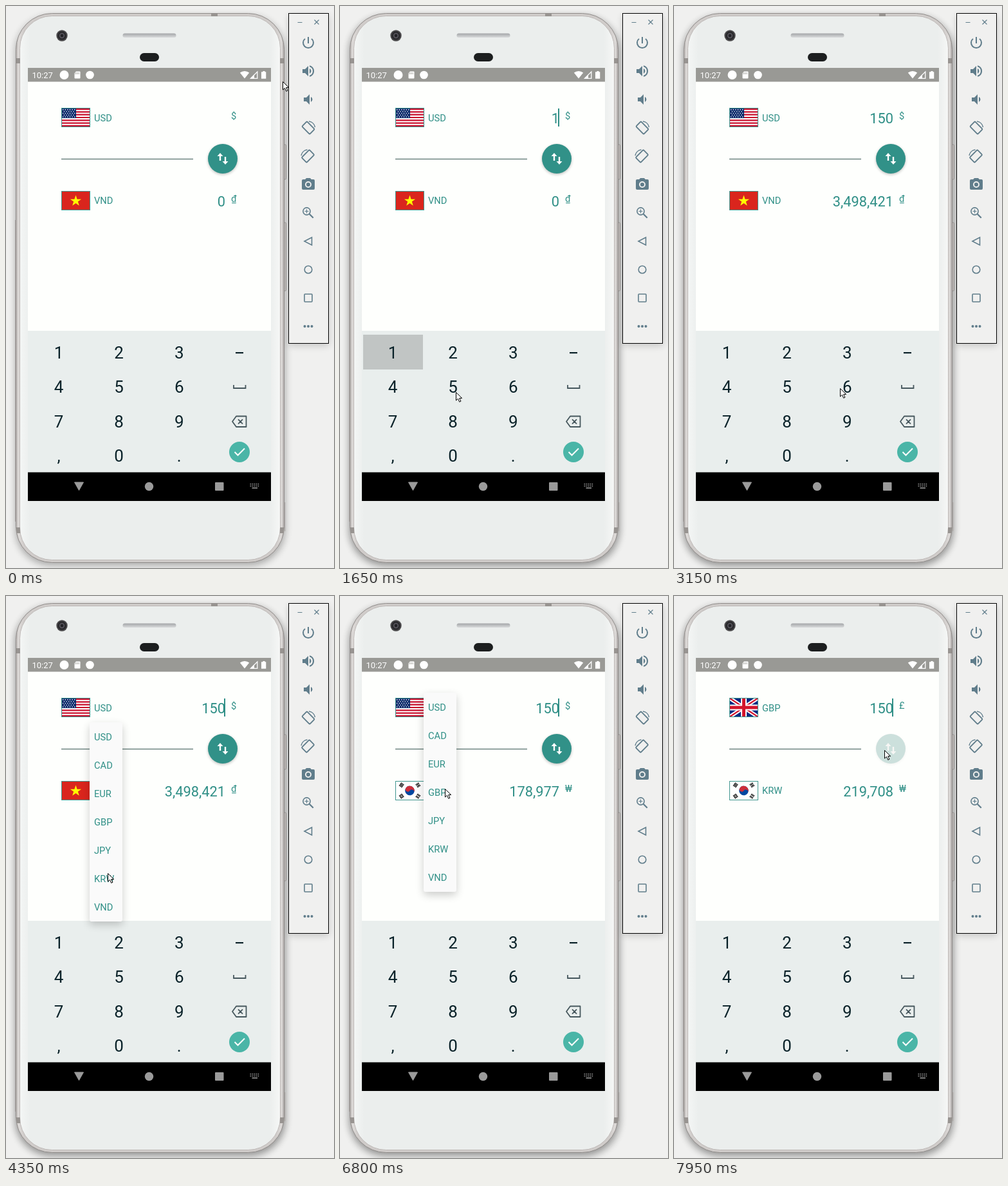
Write an HTML page that moves like this. It is 510 by 872 pixels and loops after 8000 ms.

```html
<!DOCTYPE html>
<html lang="en">
<head>
<meta charset="utf-8">
<title>Currency converter</title>
<style>
html, body { margin: 0; width: 510px; height: 872px; overflow: hidden; background: #f0f0ef; }
body { position: relative; font-family: Roboto, sans-serif; }
svg { position: absolute; left: 0; top: 0; overflow: visible; }
.teal { fill: #2f8f86; }
.label { font-size: 14.7px; }
.amount { font-size: 21.8px; text-anchor: end; }
.key { font-size: 26px; text-anchor: middle; fill: #0a2229; }
.icon { fill: #607d8b; }
.line { fill: none; stroke: #607d8b; stroke-width: 1.6; }

/* Parts that are visible for a while, switched hard */
.on { opacity: 0; animation: 8s step-end infinite; }
@keyframes focus { 7.5% { opacity: 1 } }
@keyframes caret { 11.25% { opacity: 1 } 34.375% { opacity: 0 } 40.625% { opacity: 1 } 66.25% { opacity: 0 }
  72.5% { opacity: 1 } 91.875% { opacity: 0 } 98.125% { opacity: 1 } }
@keyframes key1 { 17.5% { opacity: 1 } 21.25% { opacity: 0 } }
@keyframes key5 { 21.875% { opacity: 1 } 24.375% { opacity: 0 } }
@keyframes key0 { 28.125% { opacity: 1 } 30.625% { opacity: 0 } }
@keyframes in1 { 18.75% { opacity: 1 } 23.125% { opacity: 0 } }
@keyframes in15 { 23.125% { opacity: 1 } 29.375% { opacity: 0 } }
@keyframes in150 { 29.375% { opacity: 1 } }
@keyframes out0 { 0% { opacity: 1 } 25% { opacity: 0 } }
@keyframes out1 { 25% { opacity: 1 } 28.75% { opacity: 0 } }
@keyframes out15 { 28.75% { opacity: 1 } 33.75% { opacity: 0 } }
@keyframes out150 { 33.75% { opacity: 1 } 65% { opacity: 0 } }
@keyframes outKrw { 65% { opacity: 1 } 91.25% { opacity: 0 } }
@keyframes outGbp { 91.25% { opacity: 1 } }
@keyframes vnd { 0% { opacity: 1 } 60.625% { opacity: 0 } }
@keyframes krw { 60.625% { opacity: 1 } }
@keyframes usd { 0% { opacity: 1 } 86.25% { opacity: 0 } }
@keyframes gbp { 86.25% { opacity: 1 } }

#swap { animation: press 8s linear infinite; }
@keyframes press { 0%, 96.875% { opacity: 1 } 98.75%, 100% { opacity: .2 } }

.menu { position: absolute; left: 130px; width: 51px; height: 309px; overflow: hidden; opacity: 0;
  background: #fafafa; border-radius: 3px; box-shadow: 0 5px 13px rgba(0,0,0,.2);
  color: #2f8f86; font-size: 14.7px; animation: 8s ease-in-out infinite; }
.menu div { height: 44px; line-height: 46px; padding-left: 7px; }
#menuTo { top: 196px; animation-name: menuTo; }
#menuFrom { top: 150px; animation-name: menuFrom; }
@keyframes menuTo {
  0%, 49.3% { width: 0; height: 0; opacity: 0 } 52.5%, 60% { width: 51px; height: 309px; opacity: 1 }
  62.5%, 100% { width: 51px; height: 309px; opacity: 0 } }
@keyframes menuFrom {
  0%, 74.9% { width: 0; height: 0; opacity: 0 } 78.125%, 85.4% { width: 51px; height: 309px; opacity: 1 }
  88%, 100% { width: 51px; height: 309px; opacity: 0 } }

#pointer { animation: pointer 8s ease-in-out infinite; }
@keyframes pointer {
  0% { transform: translate(430px,117px) }
  5%, 10.625% { transform: translate(333px,171px) }
  15.625%, 18.125% { transform: translate(84px,542px) }
  20.625%, 23.75% { transform: translate(180px,599px) }
  27.5%, 30% { transform: translate(180px,675px) }
  35%, 38.75% { transform: translate(258px,597px) }
  39.375% { transform: translate(258px,593px) }
  46.25%, 50.625% { transform: translate(149px,298px) }
  54.375% { transform: translate(158px,430px) }
  55%, 56.6% { transform: translate(158px,434px) }
  56.875%, 61.25% { transform: translate(159px,435px) }
  70% { transform: translate(150px,200px) }
  73.125%, 76.875% { transform: translate(154px,172px) }
  81.875%, 86.875% { transform: translate(163px,299px) }
  91.25% { transform: translate(404px,255px) }
  95% { transform: translate(334px,240px) }
  96.25%, 100% { transform: translate(327px,239px) }
}
</style>
</head>
<body>
<svg width="510" height="872" viewBox="0 0 510 872">
  <defs>
    <filter id="soft" x="-20%" y="-20%" width="140%" height="140%"><feGaussianBlur stdDeviation="6"/></filter>
    <filter id="lift" x="-30%" y="-30%" width="160%" height="160%"><feGaussianBlur stdDeviation="2"/></filter>
    <linearGradient id="metal">
      <stop offset="0" stop-color="#b9b4b2"/><stop offset=".01" stop-color="#dedbd9"/>
      <stop offset=".03" stop-color="#d0ccca"/><stop offset=".97" stop-color="#d0ccca"/>
      <stop offset=".99" stop-color="#dedbd9"/><stop offset="1" stop-color="#b0abaa"/>
    </linearGradient>
    <linearGradient id="face">
      <stop offset="0" stop-color="#f4f6f5"/><stop offset=".04" stop-color="#ebeeed"/>
      <stop offset=".96" stop-color="#ebeeed"/><stop offset="1" stop-color="#f6f7f6"/>
    </linearGradient>
    <linearGradient id="slot" x2="0" y2="1"><stop stop-color="#a3a5a8"/><stop offset="1" stop-color="#dadcdd"/></linearGradient>
  </defs>

  <!-- phone -->
  <rect x="15" y="16" width="419" height="852" rx="56" opacity=".3" filter="url(#soft)"/>
  <rect class="on" style="animation-name:focus" x="14" y="17" width="421" height="852" rx="56" fill-opacity=".12" filter="url(#soft)"/>
  <g fill="#c2bebc" stroke="#8f8b89" stroke-width=".8">
    <rect x="431" y="215" width="4.5" height="54" rx="1.5"/>
    <rect x="431" y="336" width="4.5" height="106" rx="1.5"/>
  </g>
  <path d="M14.6 332V800M433.8 770V815" stroke="#aaa5a3"/>
  <rect x="15.5" y="11.5" width="417" height="852" rx="56" fill="url(#metal)" stroke="#8f8b89"/>
  <rect x="21.5" y="15.5" width="405" height="844" rx="50" fill="url(#face)" stroke="#bdb8b6"/>
  <g fill="#989491"><path d="M16 81h6v8h-6zM426 81h6v8h-6zM16 809h6v9h-6zM426 809h6v9h-6zM319 12h10v4h-10z"/></g>
  <circle cx="87" cy="46" r="8.7" fill="#4b4a4c"/><circle cx="87" cy="46" r="6.8" fill="#29292c"/>
  <circle cx="87" cy="46" r="4.2" fill="#55535b"/><circle cx="87" cy="46" r="2.4" fill="#222226"/>
  <rect x="181.5" y="42.5" width="83" height="6.5" rx="3.2" fill="url(#slot)"/>
  <rect x="208" y="73" width="30" height="13" rx="6.5" fill="#1c1e1f"/>

  <!-- screen -->
  <path d="M34 96h378v672H34z" fill="#fefffd"/>
  <path d="M34 96h378v21.5H34z" fill="#999995"/>
  <g fill="#fff">
    <text x="40.5" y="112" font-size="13">10:27</text>
    <circle cx="90.5" cy="107" r="7"/>
    <path d="M109 101.5h5.5a1 1 0 0 1 1 1v9a1 1 0 0 1-1 1h-7a1 1 0 0 1-1-1v-7.5z"/>
    <circle cx="130.5" cy="107" r="6.3"/>
    <path d="M371 112.5l-7.2-9a11.5 11.5 0 0 1 14.4 0z"/>
    <path d="M380.5 112.3h10.3v-10.3z" fill="none" stroke="#fff" stroke-width="1.3"/><path d="M380 112.5l6-6v6z"/>
    <path d="M399.5 101h3v1.3h1.8v10.4h-7.3v-10.4h2.5z"/>
  </g>
  <path d="M108 106v-3M110.5 106v-3M113 106v-3" stroke="#999995" stroke-width=".9"/>

  <g id="flags"></g>
  <g class="teal label">
    <g class="on" style="animation-name:usd"><text x="137" y="178.5">USD</text><text x="350" y="175">$</text></g>
    <g class="on" style="animation-name:gbp"><text x="137" y="178.5">GBP</text><text x="350" y="175">£</text></g>
    <g class="on" style="animation-name:vnd"><text x="137" y="307">VND</text><text x="350" y="304">₫</text></g>
    <g class="on" style="animation-name:krw"><text x="137" y="307">KRW</text><text x="350" y="303.5">₩</text></g>
  </g>
  <g class="teal amount" id="amounts"></g>
  <path class="on" style="animation-name:caret" d="M340 159v28" stroke="#2f8f86" stroke-width="2"/>
  <path d="M86 237.5h205" stroke="#6d8581" stroke-width="1.3"/>

  <circle cx="337" cy="237" r="23" fill="#f4f4f2"/>
  <g id="swap">
    <circle cx="337" cy="238.5" r="23" opacity=".25" filter="url(#lift)"/>
    <circle cx="337" cy="237" r="23" fill="#319188"/>
    <path fill="#fff" d="M333 228l4.5 5h-3.3v7h-2.4v-7h-3.3zM341 246l-4.5-5h3.3v-7h2.4v7h3.3z"/>
  </g>

  <!-- keyboard -->
  <path d="M34 504h378v220H34z" fill="#e9eeed"/>
  <g fill="#c1c5c4">
    <path class="on" style="animation-name:key1" d="M36 510h93v54H36z"/>
    <path class="on" style="animation-name:key5" d="M129.5 564h93v53h-93z"/>
    <path class="on" style="animation-name:key0" d="M129.5 670h93v53h-93z"/>
  </g>
  <g id="keys"></g>
  <path d="M357 537h12v2.2h-12z" fill="#0a2229"/>
  <g fill="none" stroke="#46575d" stroke-width="1.8">
    <path d="M354 588v5h18.5v-5"/>
    <path d="M358 636.5h15.5v16.5H358l-6-8.25zM361 641.3l7 7M368 641.3l-7 7" stroke-linejoin="round"/>
  </g>
  <circle cx="363" cy="692" r="16" fill="#4ab5a7"/>
  <path d="M355.5 692l5 5 10.5-10.5" fill="none" stroke="#fff" stroke-width="2"/>

  <path d="M34 723.5h378V768H34z"/>
  <g fill="#9a9a9a">
    <path d="M106.5 739h14l-7 12.5z" stroke="#9a9a9a" stroke-linejoin="round"/>
    <circle cx="222.5" cy="745.5" r="6.7"/>
    <rect x="325" y="739" width="13.5" height="13" rx="1"/>
    <path d="M379.5 741.8h14M379.5 744.8h14" stroke="#9a9a9a" stroke-width="1.6" stroke-dasharray="1.7 1.3"/>
    <path d="M382.5 747h8.5v1.6h-8.5z"/>
  </g>

  <!-- emulator toolbar -->
  <rect x="440" y="15" width="62" height="512" opacity=".18" filter="url(#soft)"/>
  <rect x="439.5" y="11.5" width="62" height="512" fill="#f0f0ef" stroke="#000"/>
  <path class="line" style="stroke-width:1.2" d="M453.5 25.5h7M479.5 21.5l7 7M486.5 21.5l-7 7"/>
  <g class="icon">
    <path transform="translate(458 45)" d="M13 3h-2v10h2V3zm4.8 2.2l-1.4 1.4A7 7 0 1 1 7.6 6.6L6.2 5.2A9 9 0 1 0 17.8 5.2z"/>
    <path transform="translate(458 89)" d="M3 9v6h4l5 5V4L7 9zM16.5 12A4.5 4.5 0 0 0 14 8v8a4.5 4.5 0 0 0 2.5-4zM14 3.2v2.1a7 7 0 0 1 0 13.4v2.1a9 9 0 0 0 0-17.6z"/>
    <path transform="translate(458 133)" d="M18.5 12A4.5 4.5 0 0 0 16 8v8a4.5 4.5 0 0 0 2.5-4zM5 9v6h4l5 5V4L9 9z"/>
    <path transform="translate(458 265)" fill-rule="evenodd" d="M9 2L7.2 4H4a2 2 0 0 0-2 2v12a2 2 0 0 0 2 2h16a2 2 0 0 0 2-2V6a2 2 0 0 0-2-2h-3.2L15 2zM12 7a5 5 0 1 1 0 10a5 5 0 1 1 0-10z"/>
    <circle cx="470" cy="277" r="3.1"/>
    <circle cx="464.5" cy="497" r="2"/><circle cx="470" cy="497" r="2"/><circle cx="475.5" cy="497" r="2"/>
  </g>
  <g class="line">
    <g id="turn" transform="translate(470 189)">
      <rect x="-5.5" y="-8.5" width="11" height="17" rx="1.5" transform="rotate(-45)" stroke-width="1.9"/>
      <path d="M1-10A11 11 0 0 1 10.5-1" stroke-width="1.5"/>
    </g>
    <use href="#turn" transform="translate(939.5 44) scale(-1 1)"/>
    <circle cx="467.5" cy="318.5" r="5.6"/>
    <path d="M471.7 322.7l6 6" stroke-width="2.2"/><path d="M464.5 318.5h6M467.5 315.5v6" stroke-width="1.2"/>
    <path d="M464 365l11.5-6v12z"/>
    <circle cx="470" cy="409" r="5.8"/>
    <rect x="464" y="447" width="12" height="12" rx="1"/>
  </g>
</svg>

<div class="menu" id="menuTo"></div>
<div class="menu" id="menuFrom"></div>

<svg width="12" height="18" viewBox="0 0 12 18" id="pointer">
  <path d="M.5.5v12.5l3-2.7 2.2 5 2.2-1-2.2-4.8h4z" fill="#fff" stroke="#000" stroke-linejoin="round"/>
</svg>

<script>
const $ = id => document.getElementById(id);
const range = n => [...Array(n).keys()];
const add = (id, html) => { $(id).innerHTML += html; };
const on = (name, body) => `<g class="on" style="animation-name:${name}">${body}</g>`;

// Flags are drawn on a 44 x 29 field
const flag = (name, y, art) => on(name, `<svg x="86.5" y="${y}" width="44" height="29" viewBox="0 0 44 29"
  style="overflow:hidden">${art}</svg><rect x="86.5" y="${y}" width="44" height="29" fill="none" stroke="#3f968e"/>`);

// Thirteen stripes inside the one pixel border
const stripe = 28 / 13;
const stripes = range(7).map(i => `<path d="M0 ${.5 + i * 2 * stripe}h44v${stripe}H0z" fill="#c8102e"/>`).join('');
const stars = range(5).map(r => range(r % 2 ? 5 : 6).map(c =>
  `<circle cx="${2.2 + c * 3.6 + r % 2 * 1.8}" cy="${2.4 + r * 2.8}" r=".8"/>`).join('')).join('');
const us = `<path d="M0 0h44v29H0z" fill="#fff"/>${stripes}<path d="M0 0h22.5v15.6H0z" fill="#0c2a6b"/><g fill="#fff">${stars}</g>`;

const starPoints = range(10).map(i => {
  const r = i % 2 ? 3.5 : 9, a = (i / 5 - .5) * Math.PI;
  return [22 + r * Math.cos(a), 15 + r * Math.sin(a)].map(v => v.toFixed(2));
}).join(' ');
const vn = `<path d="M0 0h44v29H0z" fill="#da251d"/><polygon points="${starPoints}" fill="#ff0"/>`;

// 1 marks a broken bar, from the centre outwards
const trigram = (angle, bars) => `<g transform="rotate(${angle}) translate(15.5)">` + bars.map((b, i) =>
  `<path d="M${i * 2 - 2}-3.2v6.4" ${b ? 'stroke-dasharray="2.8 .8"' : ''}/>`).join('') + '</g>';
const kr = `<path d="M0 0h44v29H0z" fill="#fff"/><g transform="translate(22 14.5)">
  <g transform="rotate(33)"><circle r="7.3" fill="#0047a0"/>
  <path d="M-7.3 0A7.3 7.3 0 0 1 7.3 0A3.65 3.65 0 0 0 0 0A3.65 3.65 0 0 1-7.3 0" fill="#cd2e3a"/></g>
  <g stroke="#111" stroke-width="1.4">${trigram(-146, [0, 0, 0]) + trigram(-34, [1, 0, 1])
    + trigram(146, [0, 1, 0]) + trigram(34, [1, 1, 1])}</g></g>`;

const bar = (d, color, width) => `<path d="${d}" stroke="${color}" stroke-width="${width}"/>`;
const saltire = 'M0 0L44 29M44 0L0 29', cross = 'M22 0v29M0 14.5h44';
const gb = '<path d="M0 0h44v29H0z" fill="#0b2a83"/>' + bar(saltire, '#fff', 6) + bar(saltire, '#d3142c', 2.2)
  + bar(cross, '#fff', 9) + bar(cross, '#d3142c', 5);

add('flags', flag('usd', 158.5, us) + flag('gbp', 158.5, gb) + flag('vnd', 287.5, vn) + flag('krw', 287.5, kr));

const amount = y => ([name, text]) => on(name, `<text x="341" y="${y}">${text}</text>`);
add('amounts', [['in1', '1'], ['in15', '15'], ['in150', '150']].map(amount(182)).join('')
  + [['out0', '0'], ['out1', '23,323'], ['out15', '349,842'], ['out150', '3,498,421'],
    ['outKrw', '178,977'], ['outGbp', '219,708']].map(amount(310.5)).join(''));

add('keys', [...'123456789,0.'].map((k, i) =>
  `<text class="key" x="${82 + i % 3 * 93.6}" y="${547 + Math.floor(i / 3) * 53.4}">${k}</text>`).join(''));

const items = ['USD', 'CAD', 'EUR', 'GBP', 'JPY', 'KRW', 'VND'].map(c => `<div>${c}</div>`).join('');
add('menuTo', items);
add('menuFrom', items);
</script>
</body>
</html>
```
